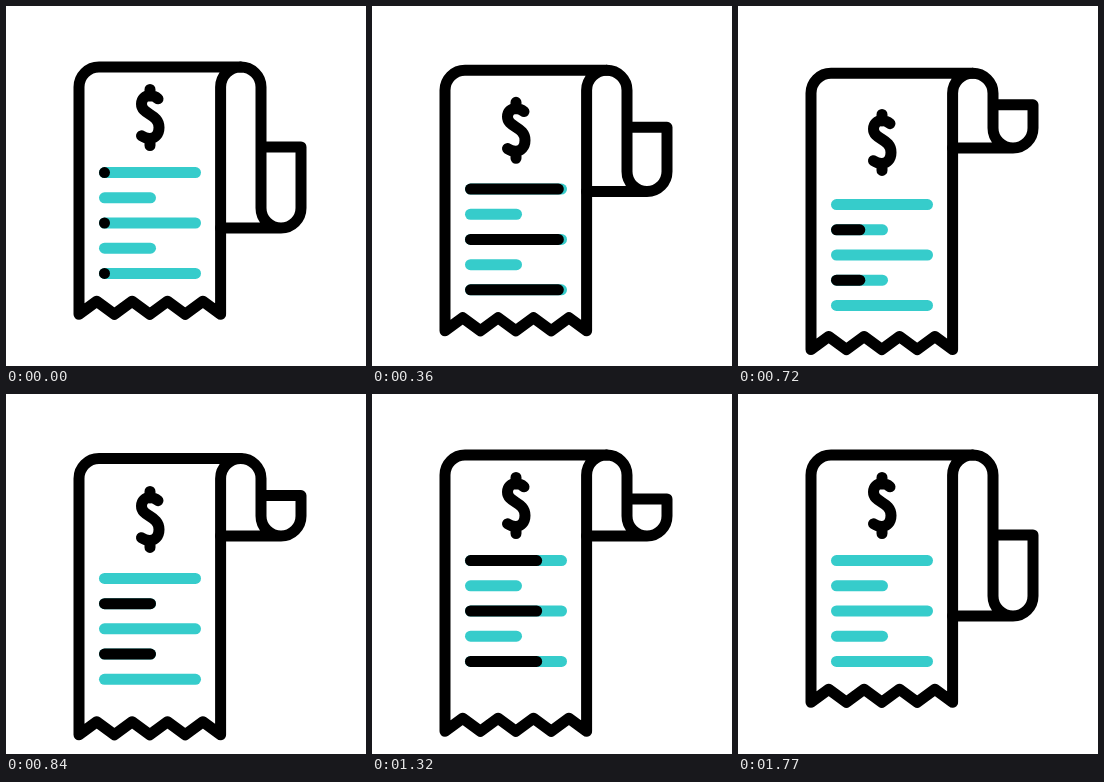
An HTML page for the animation above (1800 ms loop, 360 by 360 pixels).

```html
<!DOCTYPE html>
<html lang="en">
<head>
<meta charset="utf-8">
<title>Receipt</title>
<style>
  html, body { margin: 0; width: 100%; height: 100%; overflow: hidden; background: #fff; }
  svg { display: block; width: 100%; height: 100%; }
  path { fill: none; stroke: #000; stroke-width: 11; stroke-linecap: round; stroke-linejoin: round; }
  .row { stroke: #36cccb; }
</style>
</head>
<body>
<svg viewBox="0 0 360 360">
  <path id="paper"/>
  <path id="roll"/>
  <path id="dollar" d="M144 83.5V90 M144 133V139.5 M152 92.8C149.5 90.6 147 89.6 144 89.6C139 89.6 135.5 93 135.5 98C135.5 109 153 107.5 153 121.5C153 128 149 132.5 143.5 132.5C140.5 132.5 138 131.5 135.5 129.8"/>
  <g id="rows"></g>
</svg>
<script>
  const LOOP = 1800;
  const LEFT = 98.5, LONG = 91, SHORT = 46;
  const $ = id => document.getElementById(id);

  // Eased 0..1 progress between two times
  const ease = (t, from, to) => {
    const u = Math.min(1, Math.max(0, (t - from) / (to - from)));
    return (1 - Math.cos(Math.PI * u)) / 2;
  };

  const addPath = cls => {
    const path = document.createElementNS('http://www.w3.org/2000/svg', 'path');
    path.setAttribute('class', cls);
    return $('rows').appendChild(path);
  };

  const rows = Array.from({ length: 5 }, (_, i) => {
    const y = 166.6 + 25.2 * i, length = i % 2 ? SHORT : LONG;
    addPath('row').setAttribute('d', `M${LEFT} ${y}h${length}`);
    return { y, length, sweep: addPath('sweep') };
  });

  // Each sweep: head start, head end, tail start, tail end
  const longSweeps = [[0, 410, 360, 605], [1100, 1440, 1455, 1740]];
  const shortSweeps = [[605, 835, 840, 1070]];

  function drawSweep({ y, length, sweep }, t) {
    const list = length === LONG ? longSweeps : shortSweeps;
    const active = list.find(s => t > s[0] && t < s[3]);
    if (!active) return sweep.setAttribute('d', '');
    const head = ease(t, active[0], active[1]) * length;
    const tail = ease(t, active[2], active[3]) * length;
    sweep.setAttribute('d', `M${LEFT + tail} ${y}H${LEFT + head}`);
  }

  function draw(t) {
    const rise = ease(t, 120, 630);
    const pull = rise - ease(t, 630, 1050);
    const feed = rise - ease(t, 1390, 1655);

    const top = 61 + 7 * pull;
    const tips = 308.3 + 7 * pull + 29 * feed;
    const base = 222 - 80 * feed;
    const flap = 141 - 7 * pull - 36 * feed;

    const teeth = 'l17.7 -13l17.7 13'.repeat(4);
    $('paper').setAttribute('d',
      `M214.6 ${tips}V${top + 20}a20 20 0 0 1 20 -20H93a20 20 0 0 0 -20 20V${tips}${teeth}`);
    $('roll').setAttribute('d',
      `M234.6 ${top}a20.4 20 0 0 1 20.4 20V${base - 20}a20 20 0 0 0 20 20` +
      `M214.6 ${base}H275a20 20 0 0 0 20 -20V${flap}H255`);

    $('dollar').setAttribute('transform', `translate(0 ${28 * pull})`);
    $('rows').setAttribute('transform', `translate(0 ${36 * pull})`);
    rows.forEach(row => drawSweep(row, t));
  }

  const begin = performance.now();
  function tick() {
    draw((performance.now() - begin) % LOOP);
    requestAnimationFrame(tick);
  }
  tick();
</script>
</body>
</html>
```
